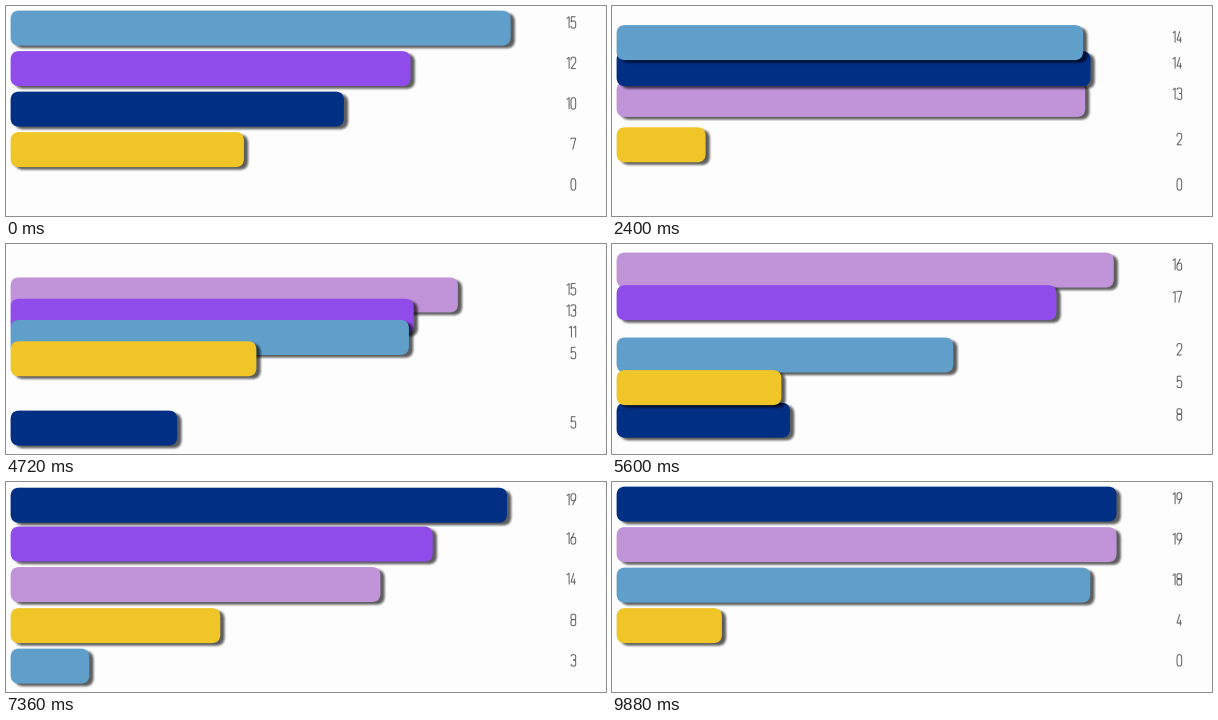
A matplotlib script for the animation above (10 s loop, 600 px wide and 210 px high).

```python
import numpy as np
import matplotlib.pyplot as plt
from matplotlib.animation import FuncAnimation
from matplotlib.patches import FancyBboxPatch, PathPatch
from matplotlib.path import Path

W, H, DPI = 600, 210, 100
STEP, LOOP = 40, 10000

LEFT, TOP, PITCH = 4.6, 4.6, 40.5
BAR_H, FULL_W, RADIUS = 35, 500, 8.5
LABEL_RIGHT, LABEL_DY = 569.7, 6.1
DIGIT_W, DIGIT_H, DIGIT_GAP = 4.7, 11.4, 1.9

# Dictionary order is also the stacking order, bottom to top.
COLORS = {"lilac": "#c194d9", "purple": "#8f4cea", "navy": "#002f84",
          "blue": "#5f9fca", "yellow": "#f0c528"}
KEYS = {name[0]: name for name in COLORS}

# Each ranking: bars from first to last place, and their values.
RANKINGS = [
    ("bpnyl", (15, 12, 10, 7, 0)),
    ("lnybp", (16, 9, 7, 7, 0)),
    ("bnlyp", (14, 14, 13, 2, 0)),
    ("ybpln", (18, 18, 11, 10, 6)),
    ("lpbyn", (15, 13, 11, 5, 5)),
    ("plnyb", (17, 16, 8, 5, 2)),
    ("nplyb", (19, 16, 14, 8, 3)),
    ("pbynl", (14, 11, 6, 3, 0)),
    ("nlbyp", (19, 19, 18, 4, 0)),
]
SWITCHES = (600, 1800, 3000, 4200, 5320, 6520, 7800, 8920)
FIRST_START, PERIOD, DURATION = 510, 1200, 1000


def layout(ranking):
    order, values = ranking
    return {KEYS[key]: (slot, FULL_W * value / max(values), value)
            for slot, (key, value) in enumerate(zip(order, values))}


LAYOUTS = [layout(ranking) for ranking in RANKINGS]


def ease(t):
    t = min(max(t, 0), 1)
    return 4 * t**3 if t < 0.5 else 1 - 4 * (1 - t)**3


def arc(top, bottom, start, stop):
    """Part of a squarish oval in the unit digit cell, angles clockwise."""
    a = np.radians(np.linspace(start, stop, 40))
    c, s = np.cos(a), np.sin(a)
    x = 0.5 + 0.5 * np.sign(c) * np.abs(c)**0.6
    y = (top + bottom) / 2 + (bottom - top) / 2 * np.sign(s) * np.abs(s)**0.6
    return np.column_stack([x, y])


def line(*points):
    return np.array(points, float)


DIGITS = {
    "0": [arc(0, 1, 0, 360)],
    "1": [line((0, 0.17), (0.5, 0), (0.5, 1))],
    "2": [np.vstack([arc(0, 0.56, 180, 385), line((0, 1), (1, 1))])],
    "3": [arc(0, 0.47, 190, 450), arc(0.47, 1, 270, 530)],
    "4": [line((0.6, 0), (0, 0.78), (1, 0.78)), line((0.72, 0.5), (0.72, 1))],
    "5": [line((0.95, 0), (0.08, 0), (0.05, 0.48)), arc(0.38, 1, 215, 530)],
    "6": [arc(0.4, 1, 0, 360), line((0.68, 0), (0.06, 0.56))],
    "7": [line((0, 0.1), (0, 0), (1, 0), (0.35, 1))],
    "8": [arc(0, 0.47, 0, 360), arc(0.47, 1, 0, 360)],
    "9": [arc(0, 0.6, 0, 360), line((0.32, 1), (0.94, 0.44))],
}


def number_path(value, top):
    right, strokes = LABEL_RIGHT, []
    for char in reversed(str(value)):
        width = DIGIT_W / 2 if char == "1" else DIGIT_W
        strokes += [Path(points * (DIGIT_W, DIGIT_H) + (right - width, top))
                    for points in DIGITS[char]]
        right -= width + DIGIT_GAP
    return Path.make_compound_path(*strokes)


class Box:
    """Rounded rectangle grown outward by `grow` and shifted by `shift`."""

    def __init__(self, ax, color, z, alpha=1, grow=0, shift=(0, 0)):
        self.grow, self.shift = grow, shift
        self.patch = FancyBboxPatch((0, 0), 1, 1, boxstyle="round,pad=0",
                                    fc=color, ec="none", alpha=alpha, zorder=z)
        ax.add_patch(self.patch)

    def place(self, y, width):
        w, h = width + 2 * self.grow, BAR_H + 2 * self.grow
        self.patch.set_visible(width > 0.5 and w > 0)
        if not self.patch.get_visible():
            return
        radius = min(RADIUS + self.grow, w / 2)
        self.patch.set_boxstyle("round", pad=0, rounding_size=radius)
        self.patch.set_bounds(LEFT - self.grow + self.shift[0],
                              y - self.grow + self.shift[1], w, h)


def shadow(ax, z):
    """Soft shadow from nested boxes whose opacity adds up to a smooth edge."""
    layers, covered = [], 0
    for k in np.arange(1, 9) / 8:
        target = 0.62 * k * k * (3 - 2 * k)
        alpha = 1 - (1 - target) / (1 - covered)
        layers.append(Box(ax, "black", z, alpha, 2.6 - 4.6 * k, (4.2, 2.6)))
        covered = target
    return layers


class Bar:
    def __init__(self, ax, name, z):
        self.boxes = shadow(ax, z) + [Box(ax, COLORS[name], z + 0.5)]
        self.label = PathPatch(number_path(0, 0), fc="none", ec="#666666",
                               lw=1.05 * 72 / DPI, zorder=20)
        ax.add_patch(self.label)

    def place(self, slot, width, value):
        y = TOP + PITCH * slot
        for box in self.boxes:
            box.place(y, width)
        self.label.set_path(number_path(value, y + LABEL_DY))


fig = plt.figure(figsize=(W / DPI, H / DPI), dpi=DPI, facecolor="#fdfdfd")
ax = fig.add_axes([0, 0, 1, 1])
ax.set(xlim=(0, W), ylim=(H, 0))
ax.axis("off")
bars = {name: Bar(ax, name, z) for z, name in enumerate(COLORS)}


def draw(frame):
    now = frame * STEP
    current = sum(now >= switch for switch in SWITCHES)
    start = FIRST_START + PERIOD * (current - 1)
    e = ease((now - start) / DURATION)
    before, after = LAYOUTS[max(current - 1, 0)], LAYOUTS[current]
    for name, bar in bars.items():
        slot0, width0, _ = before[name]
        slot1, width1, value = after[name]
        bar.place(slot0 + (slot1 - slot0) * e,
                  width0 + (width1 - width0) * e, value)


anim = FuncAnimation(fig, draw, frames=LOOP // STEP, interval=STEP,
                     init_func=lambda: draw(0), repeat=True, repeat_delay=0)
plt.show()
```
